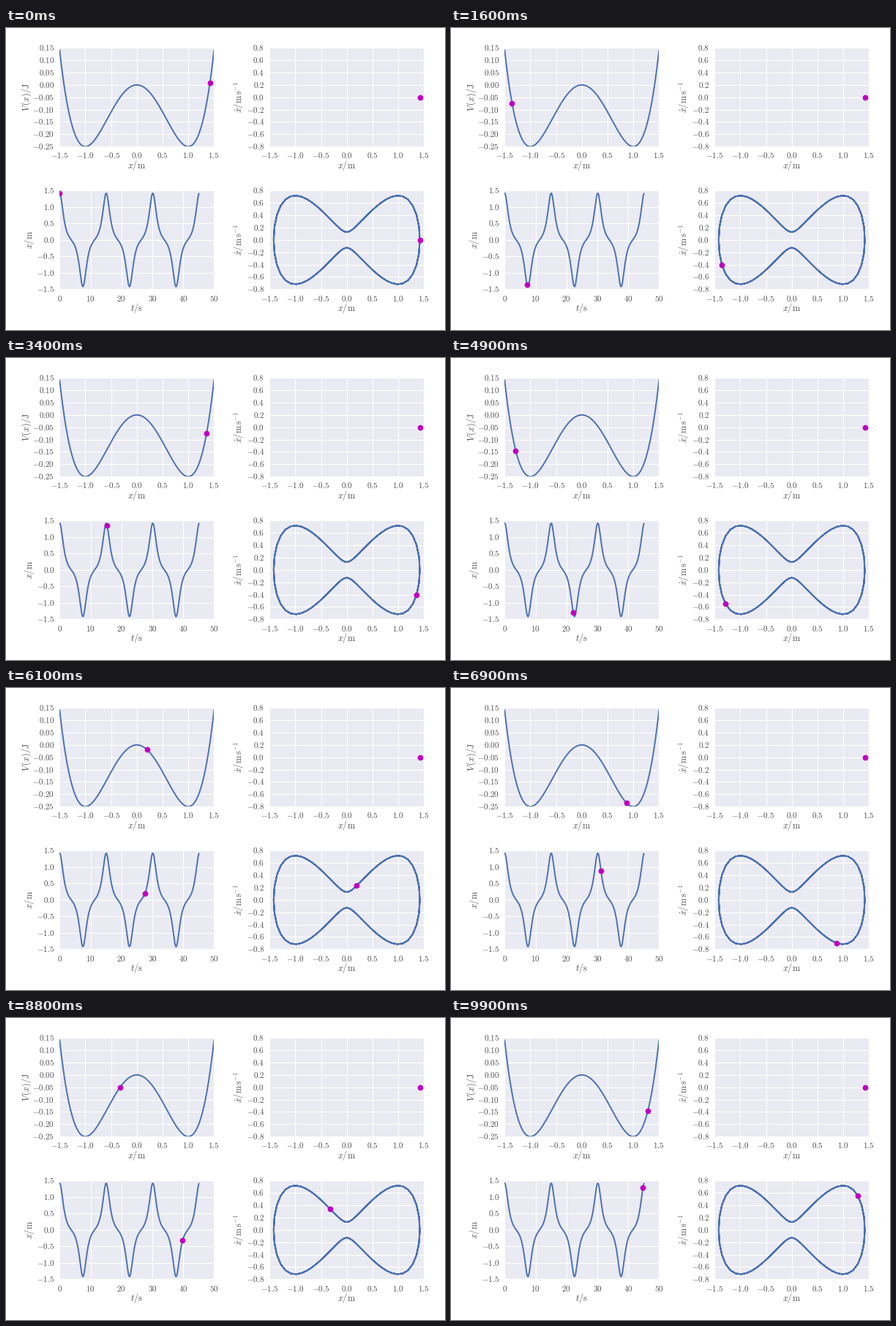
A matplotlib script that plays this animation: 600 by 413 pixels, repeating every 10000 ms.

```python
import numpy as np
import matplotlib.pyplot as plt
from matplotlib.animation import FuncAnimation

W, H, DPI = 600, 413, 80
FRAMES, STRIDE, PERIODS = 100, 3, 3
X0 = 1.42
BLUE, MAGENTA, INK = "#4c72b0", "#bf00bf", "#505050"

plt.rcParams.update({"mathtext.fontset": "cm", "text.color": INK})


def potential(x):
    return -x**2 / 2 + x**4 / 4


def period(a):
    """Exact period of x'' = x - x^3 released at rest from a."""
    w2 = a * a - 1
    p, q = 1.0, np.sqrt(1 - a * a / (2 * w2))
    for _ in range(8):
        p, q = (p + q) / 2, np.sqrt(p * q)
    return 2 * np.pi / (p * np.sqrt(w2))


def solve(a, dt, n, sub=10):
    """RK4 samples of position and velocity."""
    def rate(s):
        return np.array([s[1], s[0] - s[0]**3])

    h = dt / sub
    s = np.array([a, 0.0])
    out = []
    for _ in range(n):
        out.append(s)
        for _ in range(sub):
            k1 = rate(s)
            k2 = rate(s + h / 2 * k1)
            k3 = rate(s + h / 2 * k2)
            k4 = rate(s + h * k3)
            s = s + h / 6 * (k1 + 2 * k2 + 2 * k3 + k4)
    return np.array(out).T


n = FRAMES * STRIDE
dt = PERIODS * period(X0) / n
t = np.arange(n) * dt
x, v = solve(X0, dt, n)

fig = plt.figure(figsize=(W / DPI, H / DPI), dpi=DPI, facecolor="white")


def panel(left, top, xticks, yticks, fmt, xlabel, ylabel, ylabel_x):
    w, h = 211, 135
    ax = fig.add_axes([left / W, 1 - (top + h) / H, w / W, h / H],
                      facecolor="#eaeaf2")
    ax.set(xlim=(xticks[0], xticks[-1]), ylim=(yticks[0], yticks[-1]))
    ax.set_xticks(xticks, [f"${fmt[0] % k}$" for k in xticks])
    ax.set_yticks(yticks, [f"${fmt[1] % k}$" for k in yticks], va="center")
    ax.tick_params(length=0, labelsize=10, labelcolor=INK)
    ax.tick_params(axis="x", pad=5.6)
    ax.tick_params(axis="y", pad=6.3)
    ax.grid(color="white", lw=1)
    ax.set_axisbelow(True)
    ax.spines[:].set_visible(False)
    fig.text((left + w / 2) / W, 1 - (top + h + 25.5) / H, xlabel,
             size=11, ha="center", va="center")
    fig.text(ylabel_x / W, 1 - (top + h / 2) / H, ylabel,
             size=11, ha="center", va="center", rotation=90)
    return ax


def curve(ax, xs, ys):
    ax.plot(xs, ys, color=BLUE, lw=1.75)


def dot(ax, px, py):
    return ax.plot([px], [py], "o", color=MAGENTA, ms=7, mew=0)[0]


halves = np.arange(-3, 4) / 2
speeds = np.arange(-4, 5) / 5
levels = np.arange(-5, 4) / 20
X, V = r"$x/\mathrm{m}$", r"$\dot{x}/\mathrm{m\,s^{-1}}$"
COL1, COL2, ROW1, ROW2 = 73.3, 360.2, 27.2, 222.3

well = panel(COL1, ROW1, halves, levels, ("%.1f", "%.2f"),
             X, r"$V\,(x)/\mathrm{J}$", 28)
start = panel(COL2, ROW1, halves, speeds, ("%.1f", "%.1f"), X, V, 319)
track = panel(COL1, ROW2, np.arange(0, 51, 10), halves, ("%d", "%.1f"),
              r"$t/\mathrm{s}$", X, 32)
phase = panel(COL2, ROW2, halves, speeds, ("%.1f", "%.1f"), X, V, 319)

grid = np.linspace(-1.5, 1.5, 200)
curve(well, grid, potential(grid))
curve(track, t, x)
curve(phase, x, v)

dot(start, X0, 0)
well_dot = dot(well, X0, potential(X0))
track_dot = dot(track, 0, X0)
phase_dot = dot(phase, X0, 0)


def update(frame):
    i = frame * STRIDE
    well_dot.set_data([x[i]], [potential(x[i])])
    track_dot.set_data([t[i]], [x[i]])
    phase_dot.set_data([x[i]], [v[i]])
    return well_dot, track_dot, phase_dot


anim = FuncAnimation(fig, update, frames=FRAMES, interval=100,
                     repeat=True, repeat_delay=0)
plt.show()
```
